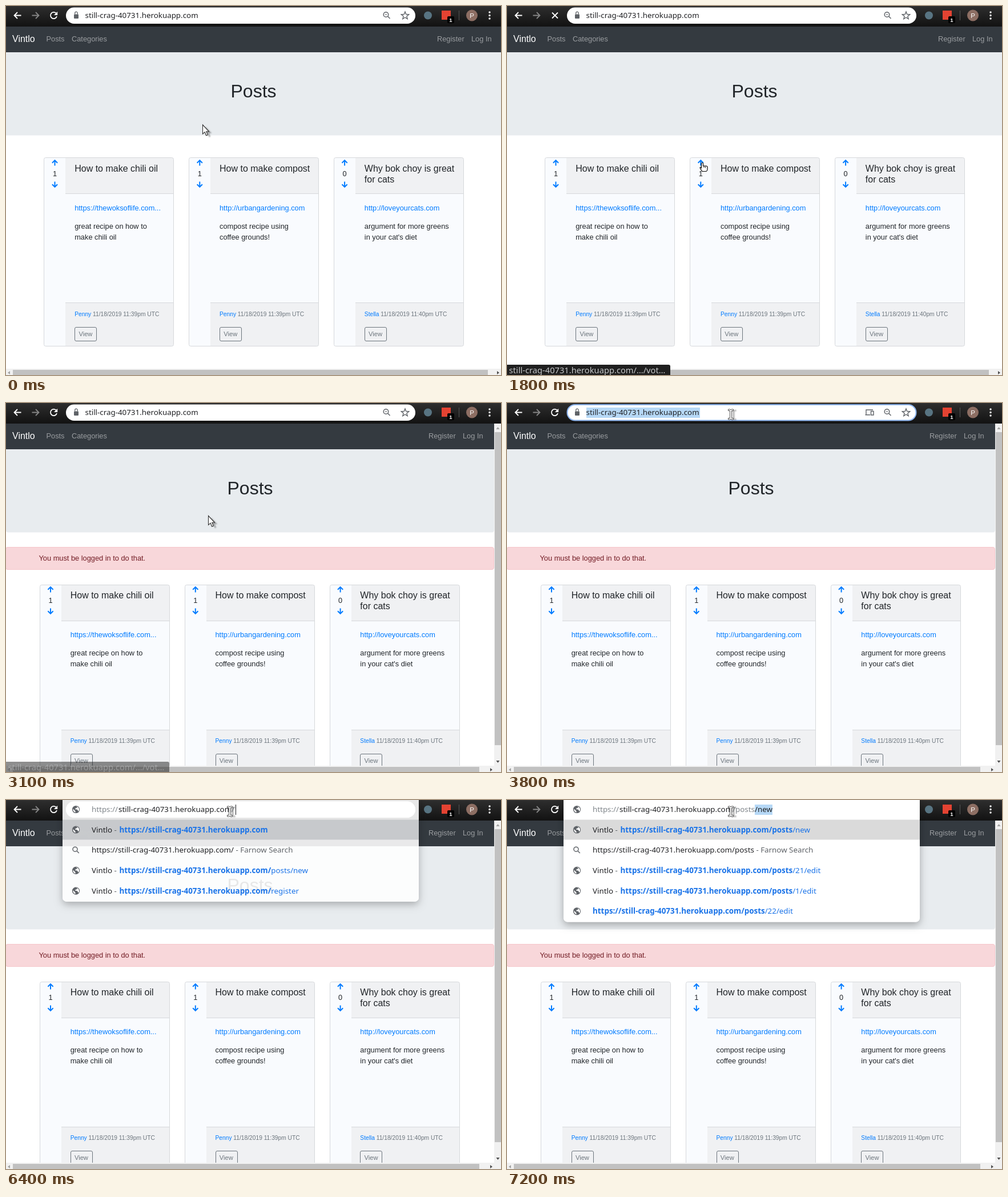
An HTML page with a canvas that plays this animation: 867x646 px, repeating every 8000 ms.

```html
<!DOCTYPE html>
<html lang="en">
<head>
<meta charset="utf-8">
<title>Posts</title>
<style>
html, body { margin: 0; width: 100%; height: 100%; overflow: hidden; background: #fff; }
canvas { display: block; }
</style>
</head>
<body>
<canvas id="stage" width="867" height="646"></canvas>
<script>
const ctx = document.getElementById("stage").getContext("2d");
const LOOP = 8000, STEP = 100;
const HOST = "still-crag-40731.herokuapp.com";
const BLUE = "#007bff", LINK = "#1a73e8", INK = "#212529", GRAY = "#5f6368", SELECTION = "#b6d8f6";

const page = size => `${size}px "Liberation Sans", Arial, sans-serif`;
const chrome = (size = 13.35, weight = "") => `${weight} ${size}px "Noto Sans", "Open Sans", sans-serif`;

const cards = [
  { votes: 1, title: ["How to make chili oil"], link: "https://thewoksoflife.com...",
    body: ["great recipe on how to", "make chili oil"], author: "Penny", date: "11/18/2019 11:39pm UTC" },
  { votes: 1, title: ["How to make compost"], link: "http://urbangardening.com",
    body: ["compost recipe using", "coffee grounds!"], author: "Penny", date: "11/18/2019 11:39pm UTC" },
  { votes: 0, title: ["Why bok choy is great", "for cats"], link: "http://loveyourcats.com",
    body: ["argument for more greens", "in your cat's diet"], author: "Stella", date: "11/18/2019 11:40pm UTC" },
];

// [time, x, y] of the pointer tip
const pointerTrack = [
  [600, 344, 208], [1000, 346, 240], [1300, 336, 270], [1500, 337, 275],
  [1800, 342, 275], [2900, 342, 275], [3300, 366, 120], [3600, 389, 32], [3800, 392, 20],
];

// [time, typed path]
const typing = [[6400, "/"], [6600, "/p"], [6800, "/po"], [6900, "/pos"], [7000, "/post"], [7200, "/posts"]];

function text(str, x, y, font, color, align = "left") {
  ctx.font = font;
  ctx.fillStyle = color;
  ctx.textAlign = align;
  ctx.fillText(str, x, y);
  return x + ctx.measureText(str).width;
}

function rect(x, y, w, h, color) {
  ctx.fillStyle = color;
  ctx.fillRect(x, y, w, h);
}

function round(x, y, w, h, radii, fill, line, width = 1) {
  ctx.beginPath();
  ctx.roundRect(x, y, w, h, radii);
  if (fill) { ctx.fillStyle = fill; ctx.fill(); }
  if (line) { ctx.strokeStyle = line; ctx.lineWidth = width; ctx.stroke(); }
}

function circle(x, y, r, color) {
  ctx.beginPath();
  ctx.arc(x, y, r, 0, 2 * Math.PI);
  ctx.fillStyle = color;
  ctx.fill();
}

function shape(d, x, y, fill, line, width = 1) {
  const path = new Path2D(d);
  ctx.save();
  ctx.translate(x, y);
  if (fill) { ctx.fillStyle = fill; ctx.fill(path); }
  ctx.shadowColor = "transparent";
  if (line) { ctx.strokeStyle = line; ctx.lineWidth = width; ctx.stroke(path); }
  ctx.restore();
}

function magnifier(x, y, r, color) {
  shape(`M${r} 0A${r} ${r} 0 1 1 ${-r} 0A${r} ${r} 0 1 1 ${r} 0M${r * .7} ${r * .7}l4 4`, x, y, null, color, 1.5);
}

function globe(x, y) {
  circle(x, y, 6.6, GRAY);
  shape("M-5 -1l4 4v2.5A5.5 5.5 0 0 1 -5 -1zM0 -5.3h2.5l-.5 2.3-3 1v2h3l1.5 2 1 1.4A5.4 5.4 0 0 0 3 -4.5", x, y, "#fff");
}

function star(x, y) {
  ctx.beginPath();
  for (let i = 0; i < 10; i++) {
    const r = i % 2 ? 3 : 7, a = i * Math.PI / 5;
    ctx.lineTo(x + r * Math.sin(a), y - r * Math.cos(a));
  }
  ctx.closePath();
  ctx.strokeStyle = GRAY;
  ctx.lineWidth = 1.4;
  ctx.stroke();
}

function voteArrow(x, y, dir) {
  shape(`M0 ${5 * dir}V${-4 * dir}M-4.6 ${dir * .2}L0 ${-4.4 * dir}L4.6 ${dir * .2}`, x, y, null, BLUE, 2);
}

function drawCard(card, index, dx, dy) {
  const left = 66.6 + index * 253.8 + dx;
  const x = Math.round(left - .2), top = Math.round(265 + dy);
  const y = base => base + Math.floor(dy);
  const border = "#d6d8db", shade = "#f0f1f3";

  round(x + .5, top + .5, 227, 330, 3, "#f9fbfe");
  rect(x + 38, top + 1, 189, 63, shade);
  rect(x + 38, top + 254, 189, 76, shade);
  rect(x + 38, top + 63, 189, 1, border);
  rect(x + 38, top + 254, 189, 1, border);
  round(x + .5, top + .5, 227, 330, 3, null, border);

  const mid = left + 18.9, tx = left + 53.6;
  voteArrow(mid, y(274.5), 1);
  text(card.votes, mid, y(298), page(12.8), INK, "center");
  voteArrow(mid, y(312.5), -1);
  card.title.forEach((line, i) => text(line, tx, y(290 + 19 * i), page(16), INK));
  text(card.link, tx, y(358), page(12.8), BLUE);
  card.body.forEach((line, i) => text(line, tx, y(390 + 19 * i), page(12.8), INK));
  const end = text(card.author, tx, y(543), page(10.24), BLUE);
  text(card.date, end + 2.85, y(543), page(10.24), "#6c757d");
  round(Math.round(tx) + .5, y(562.5), 38, 24, 2.5, null, "#6c757d");
  text("View", tx + 7.2, y(578), page(11.2), "#6c757d");
}

function drawScrollbars(denied) {
  const right = denied ? 855 : 867;
  rect(0, 635, 867, 11, "#f1f1f1");
  rect(12, 637, denied ? 817 : 832, 9, "#c1c1c1");
  shape("M2 -3v6l-4-3z", 5, 642, "#a3a3a3");
  shape("M-2 -3v6l4-3z", right - 5, 642, "#505050");
  if (!denied) return;
  rect(855, 36, 12, 599, "#f1f1f1");
  rect(856, 51, 11, 548, "#c1c1c1");
  shape("M-3 2h6l-3-4z", 861.5, 44, "#a3a3a3");
  shape("M-3 -2h6l-3 4z", 861.5, 628, "#505050");
}

function drawPage(denied) {
  const width = denied ? 855 : 867;
  ctx.save();
  ctx.beginPath();
  ctx.rect(0, 36, width, 599);
  ctx.clip();
  rect(0, 36, width, 45, "#343a40");
  text("Vintlo", 11, 63, page(16), "#fff");
  const nav = "#9a9da0", shift = width - 867;
  text("Posts", 70.5, 62, page(12.8), nav);
  text("Categories", 115, 62, page(12.8), nav);
  text("Register", 755 + shift * 1.25, 62, page(12.8), nav);
  text("Log In", 815 + shift * 1.25, 62, page(12.8), nav);
  round(0, 81, width, 145.5, denied ? [0, 0, 4, 4] : 0, "#e8ecef");
  text("Posts", width / 2, 160, page(32), INK, "center");
  if (denied) {
    round(-.5, 252.5, 855, 39, 3.5, "#f8d7da", "#f5c6cb");
    text("You must be logged in to do that.", 57.5, 276, page(12.8), "#721c24");
  }
  cards.forEach((card, i) => drawCard(card, i, denied ? -7.5 : 0, denied ? 52.5 : 0));
  ctx.restore();
  drawScrollbars(denied);
}

function drawToolbar(loading, focused, popup) {
  const gradient = ctx.createLinearGradient(0, 0, 0, 36);
  gradient.addColorStop(0, "#2e2e2e");
  gradient.addColorStop(1, "#121212");
  rect(0, 0, 867, 36, gradient);

  shape("M6.5 0H-5.5M0 -5.5L-5.5 0L0 5.5", 20, 16.5, null, "#fff", 1.8);
  shape("M-6.5 0H5.5M0 -5.5L5.5 0L0 5.5", 52, 16.5, null, "#858585", 1.8);
  if (loading) {
    shape("M-5 -5L5 5M5 -5L-5 5", 84, 16.5, null, "#fff", 1.8);
  } else {
    shape("M4 -4A5.6 5.6 0 1 0 5.5 1.5", 83.5, 16.5, null, "#fff", 1.8);
    shape("M6.7 -6.7v6.2h-6.2z", 83.5, 16.5, "#fff");
  }

  round(105, 2.5, 612, 28.5, 14.2, "#fff");
  if (!popup) {
    if (focused) {
      round(105.5, 3, 611, 27.5, 13.7, null, "#8db5f0", 2);
      shape("M-6 3.5V-4.5H6M-7.5 4.2H1M2.5 -2h4.5v6.5h-4.5z", 635, 16.5, null, GRAY, 1.4);
    }
    round(119, 14.5, 8, 7.5, 1, GRAY);
    shape("M-2.3 0v-2a2.3 2.3 0 0 1 4.6 0v2", 123, 14.5, null, GRAY, 1.3);
    magnifier(665.5, 15, 4.3, GRAY);
    rect(663.5, 14.5, 4, 1, GRAY);
    star(699, 17);
  }

  circle(739, 16.5, 7, "#587482");
  rect(763, 8, 16, 16, "#e44332");
  round(773, 18, 12, 12, 2, "#000");
  text("1", 779, 28, "bold " + page(9.5), "#fff", "center");
  rect(793, 8, 1, 17, "#555");
  circle(816, 16.5, 10, "#8d6e63");
  text("P", 816, 20.5, page(11.5), "#fff", "center");
  [11, 16.5, 22].forEach(y => circle(847, y, 1.7, "#fff"));
}

function suggestions(typed) {
  const rest = full => [typed, full.slice(typed.length)];
  if (typed === "/") return [["", ""], null, ["/", "posts/new"], ["/", "register"]];
  return [rest("/posts/new"), null, rest("/posts/21/edit"), rest("/posts/1/edit"), rest("/posts/22/edit")];
}

// The shadow is clipped to the outside so that it does not darken a translucent panel.
function dropShadow(x, y, w, h, radius) {
  ctx.save();
  ctx.beginPath();
  ctx.rect(0, 0, 867, 646);
  ctx.roundRect(x, y, w, h, radius);
  ctx.clip("evenodd");
  ctx.shadowColor = "rgba(0,0,0,.3)";
  ctx.shadowBlur = 14;
  ctx.shadowOffsetY = 5;
  round(x, y, w, h, radius, "#fff");
  ctx.restore();
}

function drawPopup(typed, fading) {
  const rows = suggestions(typed);
  const panel = [99, -20, 624, 55.5 + 35.6 * rows.length, 7];
  ctx.save();
  ctx.globalAlpha = fading ? .89 : 1;
  dropShadow(...panel);
  round(...panel, "#fff");
  rect(99, 34.5, 624, 35, fading ? "#c4c6c8" : "#dadada");
  ctx.globalAlpha = 1;
  rows.forEach((row, i) => {
    const y = 52 + 35.7 * i, base = Math.floor(y + 5);
    if (!row) {
      magnifier(121, y - 1.5, 4, GRAY);
      const end = text("https://" + HOST + typed, 150, base, chrome(), "#202124");
      text(" - Farnow Search", end, base, chrome(), GRAY);
      return;
    }
    globe(122.5, y);
    const titled = i < 4;
    if (titled) {
      const end = text("Vintlo", 150, base, chrome(), "#202124");
      text(" - ", end, base, chrome(), GRAY);
    }
    const end = text("https://" + HOST + row[0], titled ? 198.5 : 150, base, chrome(13.4, "bold"), LINK);
    text(row[1], end, base, chrome(), LINK);
  });
  ctx.restore();
  round(105, 2.5, 612, 28.5, 14.2, "#fff");
  globe(122.5, 16.5);
}

function drawAddress(t, typed) {
  const y = 21, dark = "#202124", pale = "#80868b";
  if (t < 5500) {
    if (t >= 3700) rect(139, 8, 199, 18, SELECTION);
    text(HOST, 138.5, y, chrome(), dark);
    return;
  }
  const x = typed ? 150 : 139;
  text("https://", x, y, chrome(), pale);
  let end = text(HOST, x + 47, y, chrome(), dark);
  if (!typed) {
    if (t < 6000) rect(387, 8, 1, 18, dark);
    return;
  }
  end = text(typed, end, y, chrome(), pale);
  if (typed === "/") {
    rect(402, 8, 1, 18, dark);
    return;
  }
  const completion = "/posts/new".slice(typed.length);
  ctx.font = chrome();
  rect(end, 8, ctx.measureText(completion).width, 18, SELECTION);
  text(completion, end, y, chrome(), dark);
}

function statusOpacity(t) {
  if (t < 1600 || t >= 3300) return 0;
  return Math.min(1, (t - 1500) / 200, (3300 - t) / 400 + (t < 3000 ? 1 : 0));
}

function drawStatus(t) {
  ctx.save();
  ctx.globalAlpha = statusOpacity(t);
  round(0, 628, 286, 18, [0, 3, 0, 0], "#1f1f1f");
  text(HOST + "/…/vot…", 3.5, 643, chrome(14.7), "#c4c6c8");
  ctx.restore();
}

function pointerAt(t) {
  const next = pointerTrack.findIndex(key => key[0] > t);
  if (next === 0) return pointerTrack[0].slice(1);
  if (next < 0) return pointerTrack.at(-1).slice(1);
  const [t0, x0, y0] = pointerTrack[next - 1], [t1, x1, y1] = pointerTrack[next];
  const k = (t - t0) / (t1 - t0);
  return [x0 + (x1 - x0) * k, y0 + (y1 - y0) * k];
}

function drawPointer(t) {
  const [x, y] = pointerAt(t);
  ctx.save();
  ctx.shadowColor = "rgba(0,0,0,.3)";
  ctx.shadowBlur = 2;
  if (y < 34) {
    ctx.shadowOffsetX = 5;
    ctx.shadowOffsetY = 1;
    shape("M-4.5 -9h3.5l1 1 1-1h3.5v2.5h-3v13h3v2.5h-3.5l-1-1-1 1h-3.5v-2.5h3v-13h-3z", x, y, "#fff", "#444", .9);
  } else if (t >= 1200 && t < 3000) {
    shape("M-1.5 1q0-1.5 1.5-1.5t1.5 1.5v4h5q2.5 0 2.5 2.5v3q0 3-2 4h-7q-2-2-4-6.5 1-1.5 2.5.5z", x, y, "#fff", "#111", 1.2);
    shape("M3 5v3M5.5 5.5v3M0 14.5h7", x, y, null, "#111", 1);
  } else {
    ctx.shadowOffsetX = 5;
    ctx.shadowOffsetY = 3;
    shape("M.5 0v16l3.7-3.3 2.6 6 2.6-1.1-2.6-5.8h4.7z", x, y, "#fff", "#333", 1.1);
  }
  ctx.restore();
}

function draw(t) {
  const typed = typing.findLast(([start]) => t >= start)?.[1] ?? "";
  rect(0, 0, 867, 646, "#fff");
  drawPage(t >= 2100);
  drawToolbar(t >= 1600 && t < 2200, t >= 3700, typed);
  if (typed) drawPopup(typed, t < 6500);
  drawAddress(t, typed);
  drawStatus(t);
  drawPointer(t);
}

const start = performance.now();
function tick() {
  const t = (performance.now() - start) % LOOP;
  draw(Math.floor(t / STEP) * STEP);
  requestAnimationFrame(tick);
}
tick();
</script>
</body>
</html>
```
